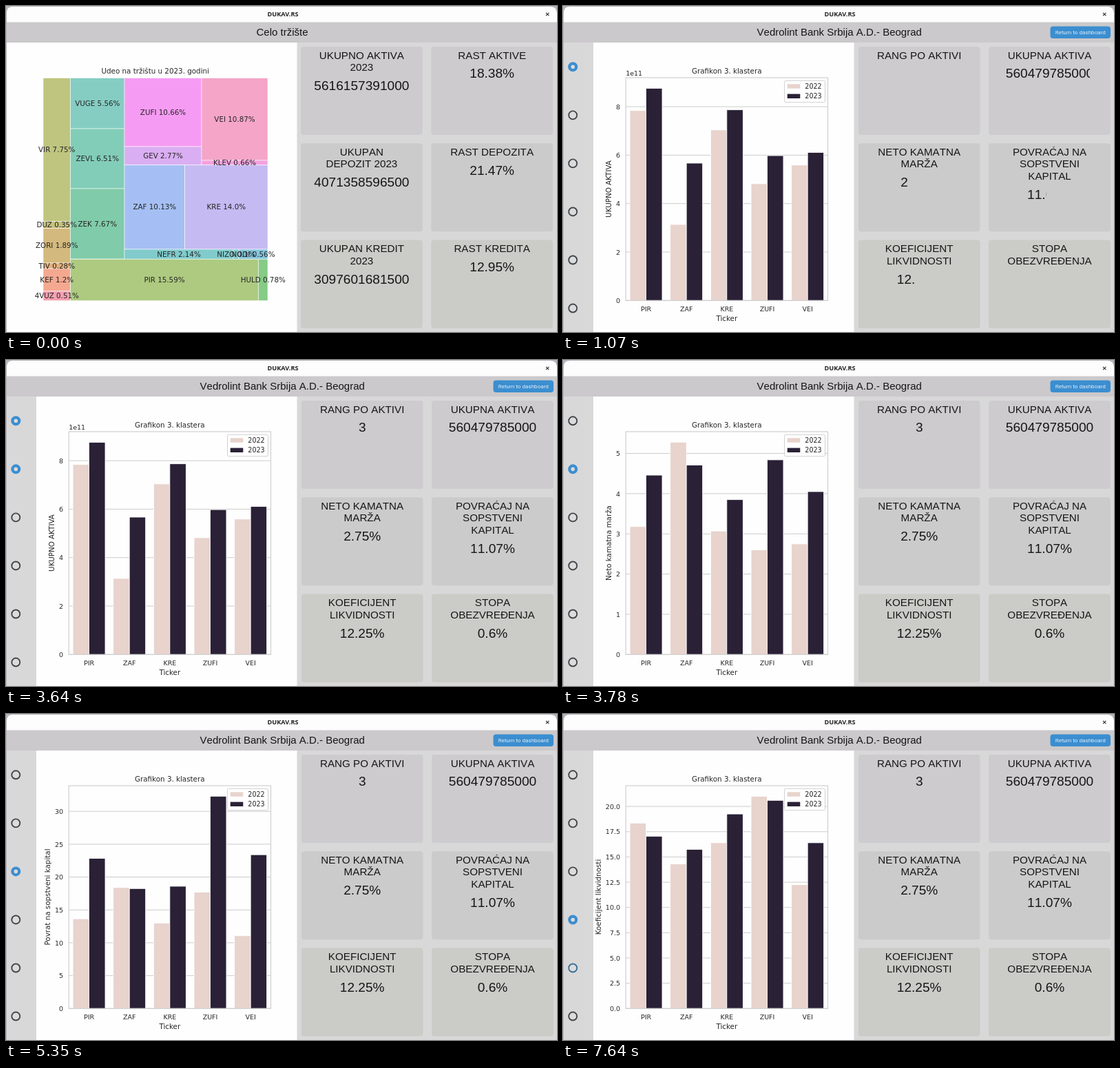
Recreate the animation shown at these times as an HTML page. Size 800x473 px, loop 8000 ms.

```html
<!DOCTYPE html>
<html lang="sr-Latn">
<head>
<meta charset="utf-8">
<title>Dashboard</title>
<style>
  html, body { margin: 0; width: 100%; height: 100%; overflow: hidden; background: #b9b4bb; }
  svg { display: block; width: 100vw; height: 100vh; }
  .ui { font-family: "Liberation Sans", Arial, sans-serif; font-kerning: none; fill: #161616; }
  .plot { font-family: "DejaVu Sans", sans-serif; fill: #262626; }
  .bar { font-family: "Noto Sans", sans-serif; font-weight: 700; fill: #222; }
  .button { font-family: Roboto, sans-serif; fill: #e4eef7; }
</style>
</head>
<body>
<script>
const NS = 'http://www.w3.org/2000/svg';
const LOOP = 8000;
const BLUE = '#3b8ed0';

function add(parent, tag, attrs = {}, content) {
  const node = document.createElementNS(NS, tag);
  for (const key in attrs) node.setAttribute(key, attrs[key]);
  if (content !== undefined) node.textContent = content;
  parent.appendChild(node);
  return node;
}
const group = (parent, attrs) => add(parent, 'g', attrs);
const rect = (parent, x, y, width, height, fill, more) =>
  add(parent, 'rect', { x, y, width, height, fill, ...more });
const text = (parent, x, y, size, content, cls, anchor = 'middle', more) =>
  add(parent, 'text', { x, y, 'font-size': size, class: cls, 'text-anchor': anchor, ...more }, content);
const line = (parent, x1, y1, x2, y2) =>
  add(parent, 'line', { x1, y1, x2, y2, stroke: '#cccccc', 'stroke-width': 1 });
const show = (node, on) => node.setAttribute('visibility', on ? 'inherit' : 'hidden');

const svg = add(document.body, 'svg', { viewBox: '0 0 800 473', preserveAspectRatio: 'none' });

// Window frame
add(svg, 'path', { d: 'M1 473V10Q1 1 10 1H790Q799 1 800 10V473Z', fill: '#fdfdfe' });
rect(svg, 1, 23.5, 799, 30, '#cbc9cb');
rect(svg, 1, 53, 799, 420, '#d9d8d9');
text(svg, 402, 15.3, 9.2, 'DUKAV.RS', 'bar');
add(svg, 'path', { d: 'M784 9.8l4.4 4.4m0-4.4l-4.4 4.4', stroke: '#333', 'stroke-width': 1.2 });

// Cards: each entry is [title lines, value]
function drawCards(page, offset, cards) {
  const values = [];
  cards.forEach(([lines, value], i) => {
    const col = i % 2, row = i >> 1;
    const x = 428 + col * 189.3 + offset, y = 59 + row * 140.3;
    const cx = x + 88.4;
    rect(page, x, y, 176.7, 128, ['#cdcbce', '#cccbcb', '#cbcbc7'][row], { rx: 4 });
    lines.forEach((t, n) => text(page, cx, y + 17.6 + n * 17.5, 15.2, t, 'ui'));
    values.push([cx, y + 27.8 + lines.length * 17.6, value]);
  });
  const layer = group(page);
  values.forEach(([x, y, value]) => text(layer, x, y, 19.1, value, 'ui'));
  return layer;
}

// Market overview
const market = group(svg);
text(market, 401, 43.3, 15, 'Celo tržište', 'ui');
rect(market, 1, 53, 421.5, 420, '#fefefe');
text(market, 216.7, 98, 10.34, 'Udeo na tržištu u 2023. godini', 'plot');

const tiles = [
  ['VIR 7.75%', 54, 104.5, 93.5, 312.5, '#bfc57f'],
  ['DUZ 0.35%', 54, 312.5, 93.5, 322.5, '#c5c07d'],
  ['ZORI 1.89%', 54, 322.5, 93.5, 373, '#d3b97d'],
  ['TIV 0.28%', 54, 373, 93.5, 381, '#e2b07c'],
  ['KEF 1.2%', 54, 381, 93.5, 413.5, '#f4a890'],
  ['4VUZ 0.51%', 54, 413.5, 93.5, 427.5, '#f6a0b0'],
  ['VUGE 5.56%', 93.5, 104.5, 172, 178, '#85cdc3'],
  ['ZEVL 6.51%', 93.5, 178, 172, 265, '#82cdb7'],
  ['ZEK 7.67%', 93.5, 265, 172, 367, '#80cba9'],
  ['ZUFI 10.66%', 172, 104.5, 284, 204, '#f69bf3'],
  ['GEV 2.77%', 172, 204, 284, 230.7, '#daaef2'],
  ['VEI 10.87%', 284, 104.5, 380, 224, '#f4a5c8'],
  ['KLEV 0.66%', 284, 224, 380, 230.7, '#f5a0de'],
  ['ZAF 10.13%', 172, 230.7, 259.5, 353, '#a5bff4'],
  ['KRE 14.0%', 259.5, 230.7, 380, 353, '#c5baf2'],
  ['NEFR 2.14%', 172, 353, 330, 367.3, '#81cbcc'],
  ['NIZO 0.1%', 330, 353, 338, 367.3, '#83c9d2'],
  ['NODI 0.56%', 338, 353, 380, 367.3, '#85c6dc'],
  ['PIR 15.59%', 93.5, 367.3, 366.5, 427.5, '#adca80'],
  ['HULD 0.78%', 366.5, 367.3, 380, 427.5, '#86cb86'],
];
const tileNodes = tiles.map(([, x, y, right, bottom, fill]) =>
  rect(market, x, y, right - x, bottom - y, fill,
    { stroke: '#fff', 'stroke-opacity': .6, 'stroke-width': .9 }));
tiles.forEach(([label, x, y, right, bottom]) =>
  text(market, (x + right) / 2, (y + bottom) / 2 + 3.5, 10.34, label, 'plot'));

drawCards(market, 0, [
  [['UKUPNO AKTIVA', '2023'], '5616157391000'],
  [['RAST AKTIVE'], '18.38%'],
  [['UKUPAN', 'DEPOZIT 2023'], '4071358596500'],
  [['RAST DEPOZITA'], '21.47%'],
  [['UKUPAN KREDIT', '2023'], '3097601681500'],
  [['RAST KREDITA'], '12.95%'],
]);

// Single bank
const bank = group(svg);
text(bank, 401.2, 43.3, 15, 'Vedrolint Bank Srbija A.D.- Beograd', 'ui');
rect(bank, 707.5, 29.5, 87.5, 17.5, BLUE, { rx: 4 });
text(bank, 751.3, 41, 8.1, 'Return to dashboard', 'button');
rect(bank, 44, 53, 378.5, 420, '#fefefe');

const values = drawCards(bank, .8, [
  [['RANG PO AKTIVI'], '3'],
  [['UKUPNA AKTIVA'], '560479785000'],
  [['NETO KAMATNA', 'MARŽA'], '2.75%'],
  [['POVRAĆAJ NA', 'SOPSTVENI', 'KAPITAL'], '11.07%'],
  [['KOEFICIJENT', 'LIKVIDNOSTI'], '12.25%'],
  [['STOPA', 'OBEZVREĐENJA'], '0.6%'],
]);
// Part of each value visible while the page is still filling in
const partial = add(svg, 'clipPath', { id: 'partial' });
[[620, 80, 765], [470, 240, 501], [650, 255, 701.5], [470, 380, 511.5]].forEach(([x, y, right]) =>
  rect(partial, x, y, right - x, 35, '#000'));

// Bar charts
const BASE = 427.3, TOP = 104, LEFT = 91.2, RIGHT = 384.5;
const SLOT = (RIGHT - LEFT) / 5;
const COLORS = ['#e8d3cd', '#2a2136'];
const tickers = ['PIR', 'ZAF', 'KRE', 'ZUFI', 'VEI'];

const charts = [
  { label: 'UKUPNO AKTIVA', labelX: 70.3, unit: 35.15, step: 2, ticks: 5, note: '1e11',
    bars: [[7.84, 8.76], [3.14, 5.67], [7.04, 7.87], [4.82, 5.98], [5.59, 6.11]] },
  { label: 'Neto kamatna marža', labelX: 70.3, unit: 58.35, step: 1, ticks: 6,
    bars: [[3.18, 4.46], [5.28, 4.71], [3.07, 3.85], [2.6, 4.84], [2.75, 4.05]] },
  { label: 'Povrat na sopstveni kapital', labelX: 64.2, unit: 9.535, step: 5, ticks: 7,
    bars: [[13.65, 22.85], [18.4, 18.25], [13, 18.6], [17.7, 32.3], [11.07, 23.4]] },
  { label: 'Koeficijent likvidnosti', labelX: 54.7, unit: 14.66, step: 2.5, ticks: 9, digits: 1,
    bars: [[18.35, 17.05], [14.3, 15.75], [16.4, 19.25], [21, 20.6], [12.25, 16.4]] },
];

function drawChart({ label, labelX, unit, step, ticks, digits = 0, note, bars }) {
  const chart = group(bank);
  for (let i = 0; i < ticks; i++) {
    const y = BASE - i * step * unit;
    line(chart, LEFT, y, RIGHT, y);
    text(chart, 83, y + 3.6, 9.5, (i * step).toFixed(digits), 'plot', 'end');
  }
  bars.forEach((pair, i) => pair.forEach((value, k) =>
    rect(chart, LEFT + SLOT * (i + .1 + k * .4), BASE - value * unit, SLOT * .4, value * unit,
      COLORS[k], { stroke: '#fff', 'stroke-width': .8 })));
  rect(chart, LEFT, TOP, RIGHT - LEFT, BASE - TOP, 'none', { stroke: '#ccc', 'stroke-width': 1.1 });
  text(chart, labelX, 265.5, 10.34, label, 'plot', 'middle',
    { transform: `rotate(-90 ${labelX} 265.5)` });
  if (note) text(chart, LEFT, 101, 9.5, note, 'plot', 'start');

  rect(chart, 321.5, 108.3, 59, 31.4, '#fff', { rx: 2, 'fill-opacity': .8, stroke: '#ccc', 'stroke-width': .9 });
  ['2022', '2023'].forEach((year, k) => {
    const y = 113.3 + k * 14.3;
    rect(chart, 325.7, y, 18.6, 6.4, COLORS[k]);
    text(chart, 351.3, y + 6.7, 9.6, year, 'plot', 'start');
  });
  return chart;
}
const chartNodes = charts.map(drawChart);
text(bank, 237.8, 98, 10.34, 'Grafikon 3. klastera', 'plot');
text(bank, 237.8, 457.3, 10.34, 'Ticker', 'plot');
tickers.forEach((t, i) => text(bank, LEFT + SLOT * (i + .5), 443.2, 9.5, t, 'plot'));

// Radio buttons
const radios = Array.from({ length: 6 }, (_, i) =>
  add(bank, 'circle', { cx: 14.3, cy: 88.3 + i * 70.05, fill: '#dcdbdc' }));
const radioStyles = {
  off: [6, 1.9, '#40464a'],
  hover: [6, 1.9, '#3a7094'],
  on: [4.9, 4.2, BLUE],
};
function styleRadio(node, state) {
  const [r, width, stroke] = radioStyles[state];
  node.setAttribute('r', r);
  node.setAttribute('stroke-width', width);
  node.setAttribute('stroke', stroke);
}

// Each step: start time, visible chart, selected radios, hovered radio
const steps = [
  [1070, 0, [0], -1],
  [2780, 0, [0], 1],
  [3640, 0, [0, 1], -1],
  [3780, 1, [1], -1],
  [4500, 1, [1], 2],
  [5350, 2, [2], -1],
  [6070, 2, [2], 3],
  [6780, 3, [3], -1],
  [7640, 3, [3], 4],
];

function render(t) {
  const onBank = t >= 1070;
  show(market, !onBank);
  show(bank, onBank);
  const pressed = t >= 500;
  tileNodes[11].setAttribute('fill', pressed ? '#f7afc9' : '#f4a5c8');
  tileNodes[12].setAttribute('fill', pressed ? '#f5a0cf' : '#f5a0de');

  if (t < 1210) values.setAttribute('clip-path', 'url(#partial)');
  else values.removeAttribute('clip-path');

  const [, chart, selected, hovered] = steps.filter(s => s[0] <= t).pop() || steps[0];
  chartNodes.forEach((node, i) => show(node, i === chart));
  radios.forEach((node, i) =>
    styleRadio(node, selected.includes(i) ? 'on' : i === hovered ? 'hover' : 'off'));
}

const start = performance.now();
function frame() {
  render((performance.now() - start) % LOOP);
  requestAnimationFrame(frame);
}
frame();
</script>
</body>
</html>
```
